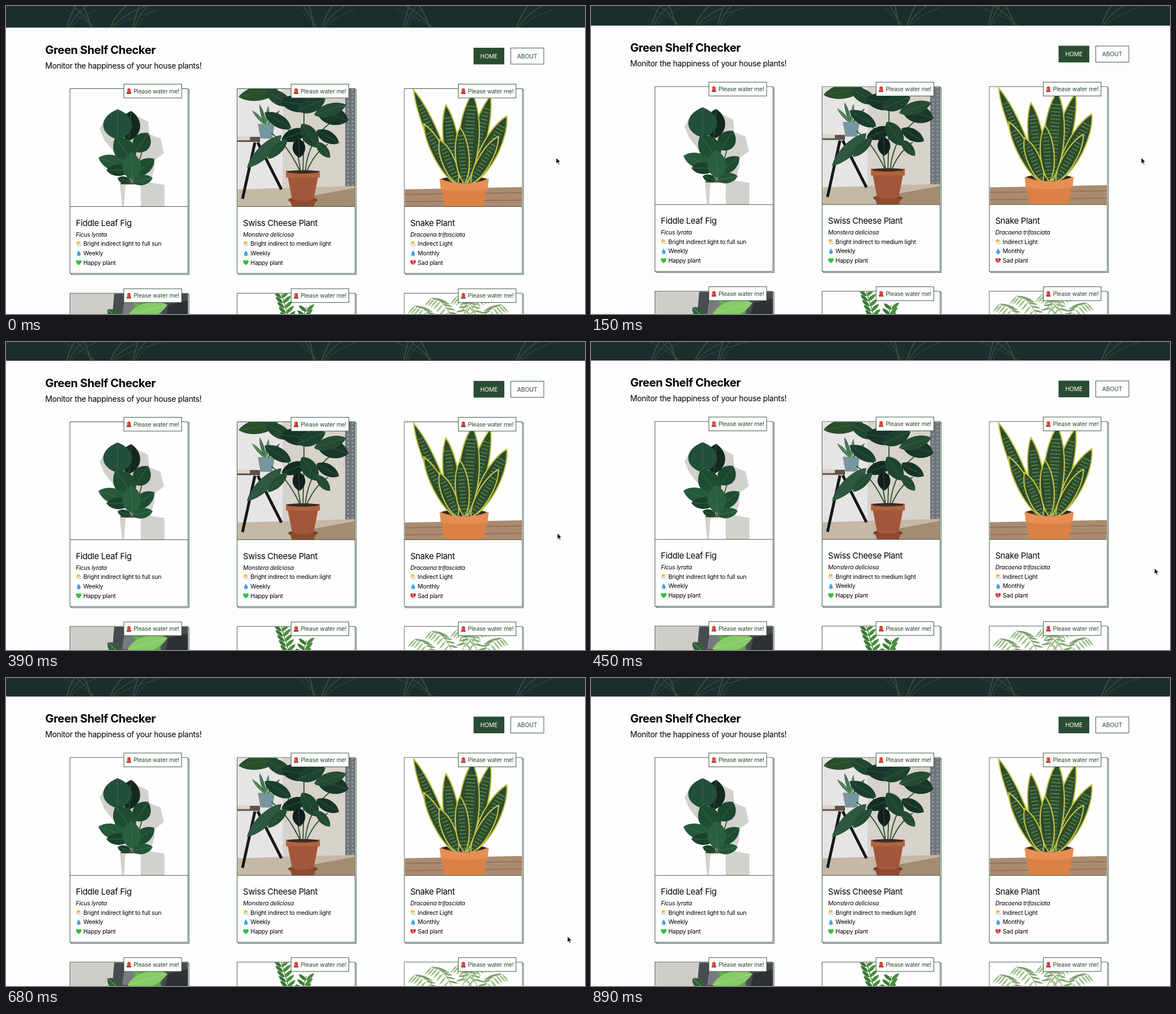
Recreate the animation shown at these times as an HTML page. Size 1026 by 546 pixels, loop 1.04 s.

```html
<!DOCTYPE html>
<html lang="en">
<head>
<meta charset="utf-8">
<title>Plants</title>
<style>
  html, body { margin: 0; width: 100%; height: 100%; overflow: hidden; background: #fdfdfd; }
  svg { display: block; }
  text { font-family: Inter, "Open Sans", sans-serif; font-size: 10.5px; letter-spacing: -.02em; fill: #000; }
  .heading { font-size: 20.2px; font-weight: 700; }
  .sub { font-size: 13.92px; }
  .name { font-size: 14.8px; }
  .latin { font-size: 10.4px; font-style: italic; }
  .badge, .button { font-size: 10.4px; fill: #2a4d32; }
  .button { text-anchor: middle; }
  .box { fill: #fefefe; stroke: #2a4d32; stroke-width: .9; }
</style>
</head>
<body>
<svg id="stage" width="1026" height="546" viewBox="0 0 1026 546">
  <defs>
    <g id="siren">
      <path d="M2 7.500V3.500a3 3 0 0 1 6 0v4z" fill="#e5352b"/>
      <path d="M3.600 6V3.800" stroke="#ffb3a0"/>
      <path d="M1 7.500h8v3H1z" fill="#8c4a48"/>
      <path d="M.3 2l1 1M9.700 2l-1 1" stroke="#f08a70" stroke-width=".8"/>
    </g>
    <g id="sun">
      <circle cx="4.500" cy="4" r="3.500" fill="#fbb62c"/>
      <path d="M3 9.500a2 2 0 0 1 0-4 2.700 2.700 0 0 1 5 0 2 2 0 0 1 0 4z" fill="#dce5ea"/>
    </g>
    <g id="drop">
      <path d="M5 0C6 2.500 8.300 4.500 8.300 6.800a3.300 3.300 0 0 1-6.600 0C1.700 4.500 4 2.500 5 0z" fill="#35a3e6"/>
      <path d="M3.500 6.500q0 2 1.500 2" stroke="#b9e4fb" fill="none"/>
    </g>
    <path id="heart" d="M5 9.500C-2 5-.3.7 2.500.7 4 .7 5 2.200 5 2.200S6 .7 7.500.7C10.300.7 12 5 5 9.500z"/>
    <g id="happy"><use href="#heart" fill="#2fc336"/></g>
    <g id="sad">
      <use href="#heart" fill="#e02b35"/>
      <path d="M5 1.500L4 4l2 1.500L4.500 10" stroke="#fff" fill="none"/>
    </g>
  </defs>
  <g id="page"></g>
  <path id="cursor" d="M0 0v10.500l2.500-2.300 1.700 3.900 1.700-.7-1.700-3.800h3.300z" fill="#000" stroke="#fff" stroke-width=".7"/>
</svg>
<script>
const GREEN = '#2a4d32';

const text = (x, y, cls, s) => `<text x="${x}" y="${y}" class="${cls}">${s}</text>`;
const icon = (id, x, y) => `<use href="#${id}" x="${x}" y="${y}"/>`;
const rect = (x, y, w, h, fill) => `<rect x="${x}" y="${y}" width="${w}" height="${h}" fill="${fill}"/>`;
const box = (x, y, w, h) => `<rect class="box" x="${x}" y="${y}" width="${w}" height="${h}"/>`;
const ellipse = (x, y, rx, ry, fill) => `<ellipse cx="${x}" cy="${y}" rx="${rx}" ry="${ry}" fill="${fill}"/>`;
const shape = (d, fill) => `<path d="${d}" fill="${fill}"/>`;
const line = (d, color, width = 1, extra = '') =>
  `<path d="${d}" fill="none" stroke="${color}" stroke-width="${width}" ${extra}/>`;

// Pointed leaf from base to tip; w sets the fullness on both sides.
function leaf(bx, by, tx, ty, w, fill, extra = '') {
  const dx = tx - bx, dy = ty - by, len = Math.hypot(dx, dy);
  const at = (k, side) => `${bx + dx * k - dy / len * w * side} ${by + dy * k + dx / len * w * side}`;
  return `<path d="M${bx} ${by}C${at(.2, 1)} ${at(.75, 1)} ${tx} ${ty}C${at(.75, -1)} ${at(.2, -1)} ${bx} ${by}" fill="${fill}" ${extra}/>`;
}
const veined = (bx, by, tx, ty, w, fill, vein) =>
  leaf(bx, by, tx, ty, w, fill) + line(`M${bx} ${by}L${tx} ${ty}`, vein, .7);
const leaves = (list, vein) => list.map(l => veined(...l, vein)).join('');

function fig() {
  return rect(0, 0, 210, 210, '#fefefe') +
    shape('M62 52L95 42 122 50 138 58 140 80 160 88 166 114 150 126 149 142 142 166 167 170V209H92L88 170 108 150 60 90 52 70z', '#d3d1cd') +
    shape('M98 170h27v39H95z', '#fdfdfd') +
    line('M110 168Q98 120 100 85M112 165Q122 130 130 100', '#5a5a3c', 2) +
    leaves([
      [104, 92, 108, 39, 24, '#14291d'], [84, 90, 84, 36, 34, '#23503a'],
      [116, 112, 138, 78, 21, '#1d4630'], [112, 130, 80, 86, 25, '#1f4d34'],
      [104, 140, 50, 122, 18, '#27593c'], [106, 144, 64, 144, 14, '#1a422b'],
      [112, 152, 149, 124, 17, '#1e4c31'], [110, 162, 108, 112, 22, '#2a5f40'],
      [110, 165, 146, 158, 12, '#24573a'], [108, 166, 84, 158, 9, '#193f29']
    ], '#4c7b57') +
    line('M89 168h38', '#3c4234', 2);
}

function monstera() {
  return rect(0, 0, 210, 210, '#d7d2cb') + rect(0, 0, 80, 180, '#e6e5e4') +
    rect(191, 0, 19, 210, '#6d747a') +
    line('M196 0V180M204 0V180', '#9a9fa2', 3, 'stroke-dasharray="3 4"') +
    shape('M0 178L210 172V210H0z', '#c6b8a6') + shape('M130 190L210 175V210H120z', '#a48c72') +
    rect(0, 85, 40, 9, '#5e5348') + rect(0, 84, 22, 7, '#d9d5cc') +
    line('M31 95L9 195M36 95L78 178', '#15191c', 5) + line('M25 120H50', '#15191c', 3) +
    shape('M36 62h30l-4 26H41z', '#7796a0') +
    leaves([
      [50, 64, 26, 38, 4, '#4a7a52'], [50, 64, 39, 27, 4, '#36683f'],
      [51, 64, 55, 30, 4, '#4e8358'], [53, 64, 75, 38, 4, '#36683f']
    ], '#8aac80') +
    line('M112 148Q105 90 82 60M116 148Q118 80 118 35M120 148Q125 90 165 60M112 148Q90 100 60 78M122 148Q135 115 160 98', '#36572f', 2) +
    leaves([
      [72, 2, 2, 14, 17, '#294f2b'], [95, 28, 50, 4, 16, '#234630'],
      [135, 30, 76, 22, 20, '#17352a'], [106, 38, 156, 18, 18, '#1f4230'],
      [140, 38, 197, 56, 22, '#193729'], [136, 46, 193, 28, 15, '#264b35'],
      [95, 70, 48, 42, 15, '#1a3d2e'], [122, 74, 78, 90, 15, '#132d22'],
      [114, 62, 142, 104, 18, '#1f4530'], [140, 74, 180, 96, 14, '#173427'],
      [108, 88, 110, 122, 15, '#101f20'], [78, 82, 17, 140, 15, '#2f573f'],
      [88, 90, 54, 124, 11, '#244c36'], [140, 94, 164, 122, 11, '#224a34']
    ], '#456b50') +
    ellipse(116, 197, 26, 6, '#7f402a') + shape('M93 198h46l-4 11H97z', '#8d4a30') +
    shape('M88 150h56l-9 46Q116 201 97 196z', '#a2573a') + rect(86, 145, 60, 12, '#b0633f') +
    ellipse(116, 147, 28, 3, '#3c2a20');
}

function blade(bx, by, tx, ty, w) {
  return leaf(bx, by, tx, ty, w, '#2b4d2c', 'stroke="#c3c048" stroke-width="2.2"') +
    line(`M${bx} ${by}L${bx + (tx - bx) * .86} ${by + (ty - by) * .86}`, '#66885a', w * .7, 'stroke-dasharray="1.5 5"');
}

function snake() {
  const blades = [
    [84, 162, 16, 2, 14], [88, 166, 34, 62, 15], [110, 168, 152, 12, 18],
    [122, 166, 181, 48, 21], [92, 168, 73, 28, 18], [108, 168, 120, 8, 24],
    [118, 168, 166, 84, 15], [94, 168, 62, 90, 15], [106, 168, 98, 68, 16]
  ];
  return rect(0, 0, 210, 210, '#fefefe') +
    shape('M0 178L210 174V210H0z', '#ab8b70') +
    line('M0 187L210 184M0 200L210 197', '#8c6d55', 1.5) +
    ellipse(105, 162, 43, 7, '#33271f') +
    blades.map(b => blade(...b)).join('') +
    shape('M65 176h80l-5 34H71z', '#dc8146') +
    shape('M62 159Q105 176 149 159L147 178Q105 184 64 178z', '#e78f52');
}

function calathea() {
  return rect(0, 0, 210, 210, '#cfcdc9') +
    shape('M78 0H210V210H60z', '#464c50') + shape('M98 0H168L160 40H92z', '#777b7c') +
    leaves([
      [88, 48, 66, 28, 11, '#315e3a'], [166, 52, 110, 14, 15, '#5da64c'],
      [102, 40, 172, 20, 18, '#87cb68']
    ], '#c1d99b') +
    shape('M174 20L210 12V45H168z', '#2d3134');
}

function zamia() {
  let out = rect(0, 0, 210, 210, '#fefefe');
  for (const [x, lean, top] of [[78, .3, 0], [122, -.3, 24]]) {
    out += line(`M${x} ${top}L${x + lean * 60} ${top + 60}`, '#5f8f3f', 1.5);
    for (let y = top; y < 52; y += 9) {
      const cx = x + lean * (y - top);
      out += leaf(cx, y + 8, cx - 13, y - 3, 4, '#397b36') + leaf(cx, y + 8, cx + 14, y - 5, 4, '#4b8d3f');
    }
  }
  return out;
}

function palm() {
  let out = rect(0, 0, 210, 210, '#fefefe');
  const fronds = [[18, 22, 1], [48, 8, 1], [93, 5, 1], [138, 4, -1], [172, 20, -1]];
  for (const [x, y, side] of fronds) {
    out += line(`M${x} ${y}Q${x + side * 25} ${y} ${x + side * 42} 60`, '#8eb073', 1.3);
    for (let i = 0; i < 7; i++) {
      const px = x + side * i * 5, py = y + i * i * .7;
      out += leaf(px, py, px - side * 12, py + 14, 2, '#9dbf87') +
        leaf(px, py, px + side * 17, py + 4, 2, '#7f9f70');
    }
  }
  return out;
}

const plants = [
  { art: fig, name: 'Fiddle Leaf Fig', latin: 'Ficus lyrata', light: 'Bright indirect light to full sun', water: 'Weekly', mood: 'Happy' },
  { art: monstera, name: 'Swiss Cheese Plant', latin: 'Monstera deliciosa', light: 'Bright indirect to medium light', water: 'Weekly', mood: 'Happy' },
  { art: snake, name: 'Snake Plant', latin: 'Dracaena trifasciata', light: 'Indirect Light', water: 'Monthly', mood: 'Sad' },
  { art: calathea }, { art: zamia }, { art: palm }
];

function card(plant, i) {
  const x = 113.3 + i % 3 * 296.3, y = 146.5 + Math.floor(i / 3) * 362.7;
  const details = plant.name ? text(10.5, 243, 'name', plant.name) + text(10.5, 262, 'latin', plant.latin) +
    [['sun', plant.light], ['drop', plant.water], [plant.mood.toLowerCase(), plant.mood + ' plant']]
      .map(([id, s], row) => icon(id, 10.5, 270 + row * 16.7) + text(23.7, 278.7 + row * 16.7, '', s)).join('') : '';
  return `<g transform="translate(${x} ${y})">` + box(2, 2, 209, 327.5) + box(0, 0, 209, 327.5) +
    `<svg x=".5" y=".5" width="208" height="208.5">${plant.art()}</svg>` +
    line('M0 209H209', GREEN, .9) + details +
    box(95.6, -8, 102.3, 24.5) + icon('siren', 99.5, -1) + text(112.6, 8.2, 'badge', 'Please water me!') + '</g>';
}

// Faint fans of grass-like leaves on a dark strip.
function banner() {
  let out = rect(0, -10, 1026, 48.3, '#1c2d2d');
  for (const [x, lean] of [[108, 40], [150, -35], [185, 70], [225, 30], [545, -20], [560, 45], [705, 25], [750, -45], [905, 50]])
    for (let i = 0; i < 3; i++) {
      const reach = lean * (.5 + i * .4);
      out += line(`M${x + i * 4} 38Q${x + reach * .3} ${12 + i * 5} ${x + reach} ${i * 6 - 6}`, '#32503c', 2.2 - i * .6);
    }
  return out;
}

document.getElementById('page').innerHTML = banner() +
  text(69.5, 84.5, 'heading', 'Green Shelf Checker') +
  text(69.5, 110.7, 'sub', 'Monitor the happiness of your house plants!') +
  rect(828.5, 74, 54.5, 29.5, GREEN) +
  `<text x="855.7" y="92.6" class="button" style="fill:#fff">HOME</text>` +
  box(894.5, 74.5, 58.5, 28.5) + text(923.5, 92.6, 'button', 'ABOUT') +
  plants.map(card).join('');

// Each pose holds until the next: start time, scroll offset, pointer tip.
const poses = [
  [0, 0, 975, 269], [150, 3.5, 975, 269], [300, 5, 977, 339], [450, 5.5, 998.5, 401],
  [590, 5.5, 995, 458], [740, 5.5, 1002, 529], [890, 5.5, 1002, 600]
];
const page = document.getElementById('page'), cursor = document.getElementById('cursor');

function draw() {
  const t = performance.now() % 1040;
  const [, scroll, x, y] = poses.findLast(pose => pose[0] <= t);
  page.setAttribute('transform', `translate(0 ${-scroll})`);
  cursor.setAttribute('transform', `translate(${x} ${y})`);
  requestAnimationFrame(draw);
}
draw();
</script>
</body>
</html>
```
